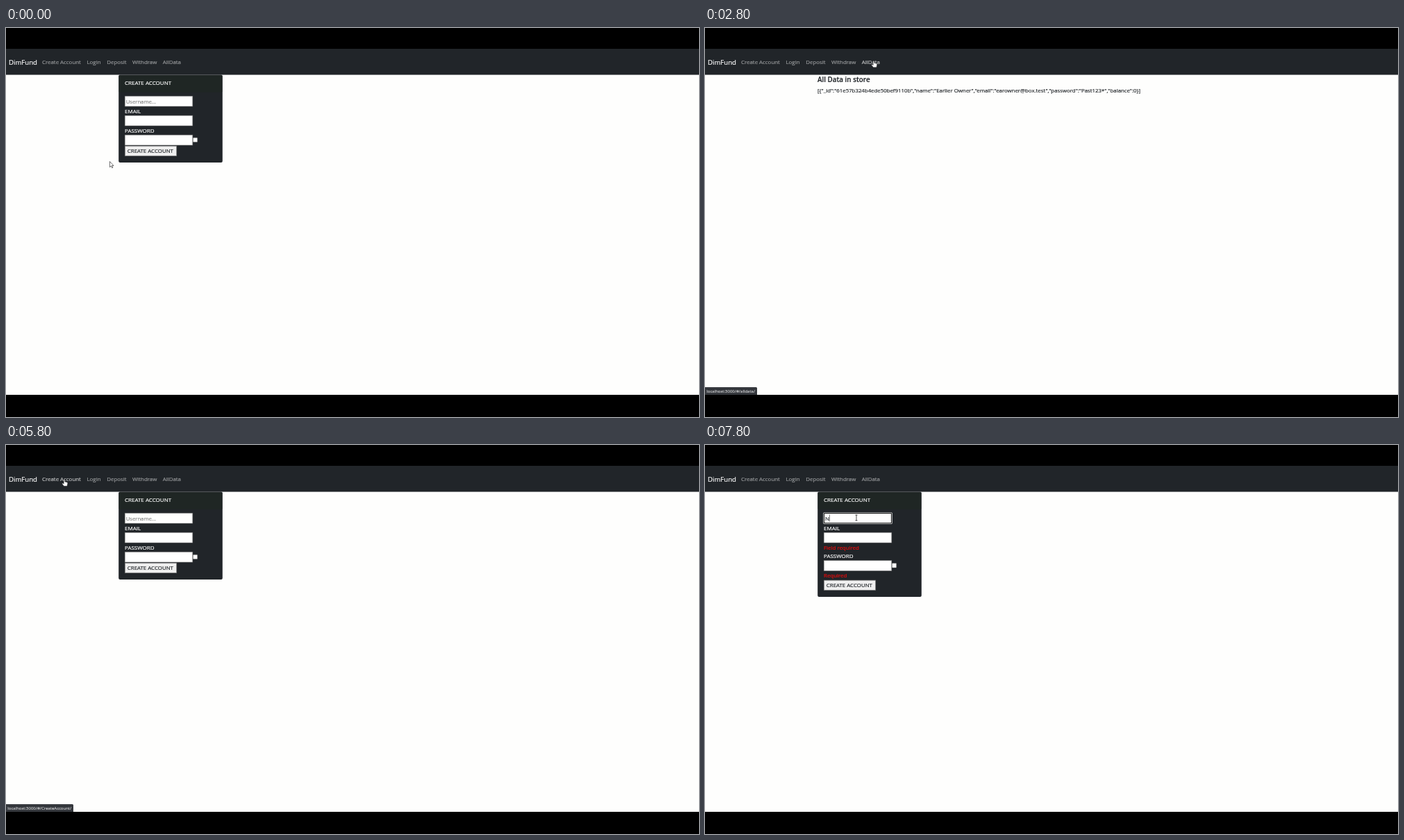
These frames come from a looping animation (998 by 561 pixels, 8000 ms). An HTML page:

```html
<!DOCTYPE html>
<html lang="en">
<head>
<meta charset="utf-8">
<title>Bank demo</title>
<style>
  html, body { margin: 0; width: 100%; height: 100%; overflow: hidden; background: #000; }
  svg { display: block; width: 100%; height: 100%; }
  text {
    font: 7.9px "Open Sans", "Noto Sans", sans-serif; white-space: pre;
    color: #fff; fill: currentColor; stroke: currentColor; stroke-width: .18;
  }
  .brand { font-size: 9.6px; }
  .link { color: #989a9c; }
  .link.lit { color: #c4c5c6; }
  .title { font-size: 9.85px; font-weight: 600; }
  .dark { color: #212529; }
  .caps { font-size: 8px; }
  .json { font-size: 7.83px; }
  .hint { font-size: 7.7px; color: #858585; }
  .error { color: #f00a0a; }
  .status { font-size: 6px; color: #c3c4c6; }
  .card { fill: #212529; }
  .head { fill: #1f2624; }
  .field { fill: #fff; stroke: #777; stroke-width: .6; }
  .off { display: none; }
</style>
</head>
<body>
<svg viewBox="0 0 998 561" preserveAspectRatio="none">
  <defs>
    <clipPath id="selected"><rect id="selectedClip" x="338" y="84" width="53" height="13"/></clipPath>
  </defs>

  <rect width="998" height="561"/>
  <rect y="30" width="998" height="499" fill="#fefefd"/>
  <rect y="30" width="998" height="37.5" fill="#212529"/>
  <text class="brand" x="4" y="52.9">DimFund</text>
  <g id="links">
    <text class="link" x="52" y="52">Create Account</text>
    <text class="link" x="116.5" y="52">Login</text>
    <text class="link" x="145.3" y="52">Deposit</text>
    <text class="link" x="182" y="52">Withdraw</text>
    <text class="link" x="225.7" y="52">AllData</text>
  </g>

  <g id="home">
    <rect class="card" x="162.2" y="67.5" width="149.6" height="220.8" rx="2"/>
    <rect class="head" x="162.7" y="68" width="148.6" height="25" rx="1.5"/>
    <text x="171" y="81.7">DimFund Landing Module</text>
    <text class="title" x="171" y="107.8">Welcome to the bank</text>
    <text x="171" y="123.9">You can move around using the</text>
    <text x="171" y="136.4">navigation bar.</text>
    <path d="M234.5 148.6Q237 147.4 239.5 148.6L299.5 174.5Q303 176.5 303 181Q303 187 298 187H176Q171 187 171 181Q171 176.5 174.5 174.5Z"/>
    <rect x="181" y="192" width="112" height="6.3" rx="3"/>
    <path d="M186 197h12v56h-12zM216 197h12v56h-12zM246 197h12v56h-12zM276 197h12v56h-12z"/>
    <rect x="178.5" y="251.7" width="117" height="12.3" rx="6"/>
    <rect x="171" y="267" width="132" height="12.6" rx="6"/>
  </g>

  <g id="create">
    <rect id="formCard" class="card" x="162.2" y="67.5" width="149.6" height="126.5" rx="2"/>
    <rect class="head" x="162.7" y="68" width="148.6" height="25" rx="1.5"/>
    <text class="caps" x="171" y="81.7">CREATE ACCOUNT</text>
    <rect class="field" x="171.2" y="98.2" width="97.6" height="14.8"/>
    <g id="focus">
      <rect x="170.4" y="97.4" width="99.2" height="16.4" rx="1" fill="#fff"/>
      <rect x="171.6" y="98.6" width="96.8" height="14" fill="#fff" stroke="#101010"/>
    </g>
    <text id="hint" class="hint" x="172.7" y="108.5">Username...</text>
    <g id="typed">
      <text class="dark" x="173" y="108.5">N</text>
      <path d="M179.4 100.5v10" stroke="#222" stroke-width=".6"/>
    </g>
    <text class="caps" x="171" y="122.9">EMAIL</text>
    <rect class="field" x="171.2" y="126.2" width="97.6" height="14.8"/>
    <text id="emailError" class="error" x="171" y="151">Field required</text>
    <g id="password">
      <text class="caps" x="171" y="150.9">PASSWORD</text>
      <rect class="field" x="171.2" y="154.2" width="97.6" height="14.8"/>
      <rect x="269.3" y="158.2" width="6.4" height="6.4" rx=".8" fill="#fff" stroke="#666" stroke-width=".5"/>
    </g>
    <text id="passwordError" class="error" x="171" y="191.4">Required</text>
    <g id="submit">
      <rect x="171.3" y="170.2" width="74.4" height="14.2" fill="#efefef" stroke="#777" stroke-width=".7"/>
      <text class="dark" x="174.8" y="180.2">CREATE ACCOUNT</text>
    </g>
  </g>

  <g id="data">
    <text class="title dark" x="162" y="77.8">All Data in store</text>
    <text class="json dark" x="162" y="93.4">[{"_id":"61e57b324b4ede50bef9110b","name":"Earlier Owner","email":"earowner@box.test","password":"Past123*","balance":0}]</text>
    <g id="selection">
      <rect id="selectionBox" x="338" y="84" width="53" height="13" fill="#3594fb"/>
      <g clip-path="url(#selected)"><text id="selectionText" class="json" x="162" y="93.4"></text></g>
    </g>
  </g>

  <g id="status">
    <path id="statusBox" fill="#35383d"/>
    <text id="statusText" class="status" x="2.3" y="526"></text>
  </g>

  <g id="cursor">
    <path id="arrow" d="M.4.5V8.7L2.3 7 3.7 9.8 4.9 9.2 3.6 6.5H6Z" fill="#fff" stroke="#333" stroke-width=".7"/>
    <path id="hand" d="M-.8.8Q0-.3.8.8V3.4L4 4.2Q5 4.5 4.8 6L4 9.8H-.6L-3.2 6.4Q-3.2 5.2-2 5.5L-.8 6.5Z" fill="#fff" stroke="#222" stroke-width=".5"/>
    <path id="beam" d="M-1.5-4H1.5M0-4V4M-1.5 4H1.5" fill="none" stroke="#222" stroke-width=".8"/>
  </g>
</svg>
<script>
const STEP = 200, STEPS = 40;
const $ = id => document.getElementById(id);
const show = (id, on) => $(id).classList.toggle('off', !on);

// Cursor stops: step, x, y, shape
const stops = [
  [0, 149, 192, 'arrow'], [2, 35, 58, 'hand'], [3, 24, 46, 'hand'], [6, 24, 46, 'hand'],
  [8, 84, 49.5, 'hand'], [12, 84, 49.5, 'hand'], [14, 243, 47, 'hand'], [16, 243, 47, 'hand'],
  [17, 252, 72, 'arrow'], [18, 300, 90, 'beam'], [20, 600, 91, 'beam'], [22, 391, 91, 'beam'],
  [24, 338, 91, 'beam'], [25, 303.5, 142, 'arrow'], [28, 84, 49.5, 'hand'], [30, 84, 49.5, 'hand'],
  [31, 158, 50, 'hand'], [32, 219, 104, 'beam'], [34, 218, 105, 'beam']
];
// Values that hold from a step until the next entry
const pages = [[0, 'create'], [3, 'home'], [8, 'create'], [14, 'data'], [29, 'create']];
const statuses = [[0, ''], [3, '/'], [8, '/CreateAccount/'], [13, '/alldata/'], [17, ''],
  [28, '/CreateAccount/'], [31, '/deposit/'], [33, '']];
const statusWidth = { '/': 54, '/CreateAccount/': 97, '/alldata/': 75, '/deposit/': 77 };
const litLinks = [[0, -1], [8, 0], [13, -1], [14, 4], [17, -1], [28, 0], [34, -1]];

const latest = (list, step) => list.filter(item => item[0] <= step).pop();
const held = (list, step) => latest(list, step)[1];

$('selectionText').textContent = document.querySelector('.json').textContent;

function drawCursor(step) {
  const from = latest(stops, step);
  const to = stops.find(stop => stop[0] > step) || from;
  const part = to === from ? 0 : (step - from[0]) / (to[0] - from[0]);
  const at = i => from[i] + (to[i] - from[i]) * part;
  $('cursor').setAttribute('transform', `translate(${at(1)} ${at(2)})`);
  for (const shape of ['arrow', 'hand', 'beam']) show(shape, shape === from[3]);
}

function drawForm(step) {
  const typed = step >= 38, focused = step >= 34;
  show('focus', focused);
  show('typed', typed);
  show('hint', !typed);
  show('emailError', typed);
  show('passwordError', typed);
  $('password').setAttribute('transform', `translate(0 ${typed ? 12.4 : 0})`);
  $('submit').setAttribute('transform', `translate(0 ${typed ? 24.9 : 0})`);
  $('formCard').setAttribute('height', typed ? 151.4 : 126.5);
}

function drawSelection(step) {
  show('selection', step >= 23 && step < 29);
  const left = step === 23 ? 364.5 : 338;
  for (const id of ['selectionBox', 'selectedClip']) {
    $(id).setAttribute('x', left);
    $(id).setAttribute('width', 391 - left);
  }
}

function drawStatus(step) {
  const path = held(statuses, step);
  show('status', path);
  if (!path) return;
  $('statusText').textContent = 'localhost:3000/#' + path;
  $('statusBox').setAttribute('d', `M0 518H${statusWidth[path] - 1.5}q1.5 0 1.5 1.5V529H0Z`);
}

let drawn = -1;
function frame() {
  const step = Math.floor(performance.now() / STEP) % STEPS;
  if (step !== drawn) {
    drawn = step;
    const page = held(pages, step), lit = held(litLinks, step);
    for (const id of ['home', 'create', 'data']) show(id, id === page);
    [...$('links').children].forEach((link, i) => link.classList.toggle('lit', i === lit));
    drawForm(step);
    drawSelection(step);
    drawStatus(step);
    drawCursor(step);
  }
  requestAnimationFrame(frame);
}
frame();
</script>
</body>
</html>
```
